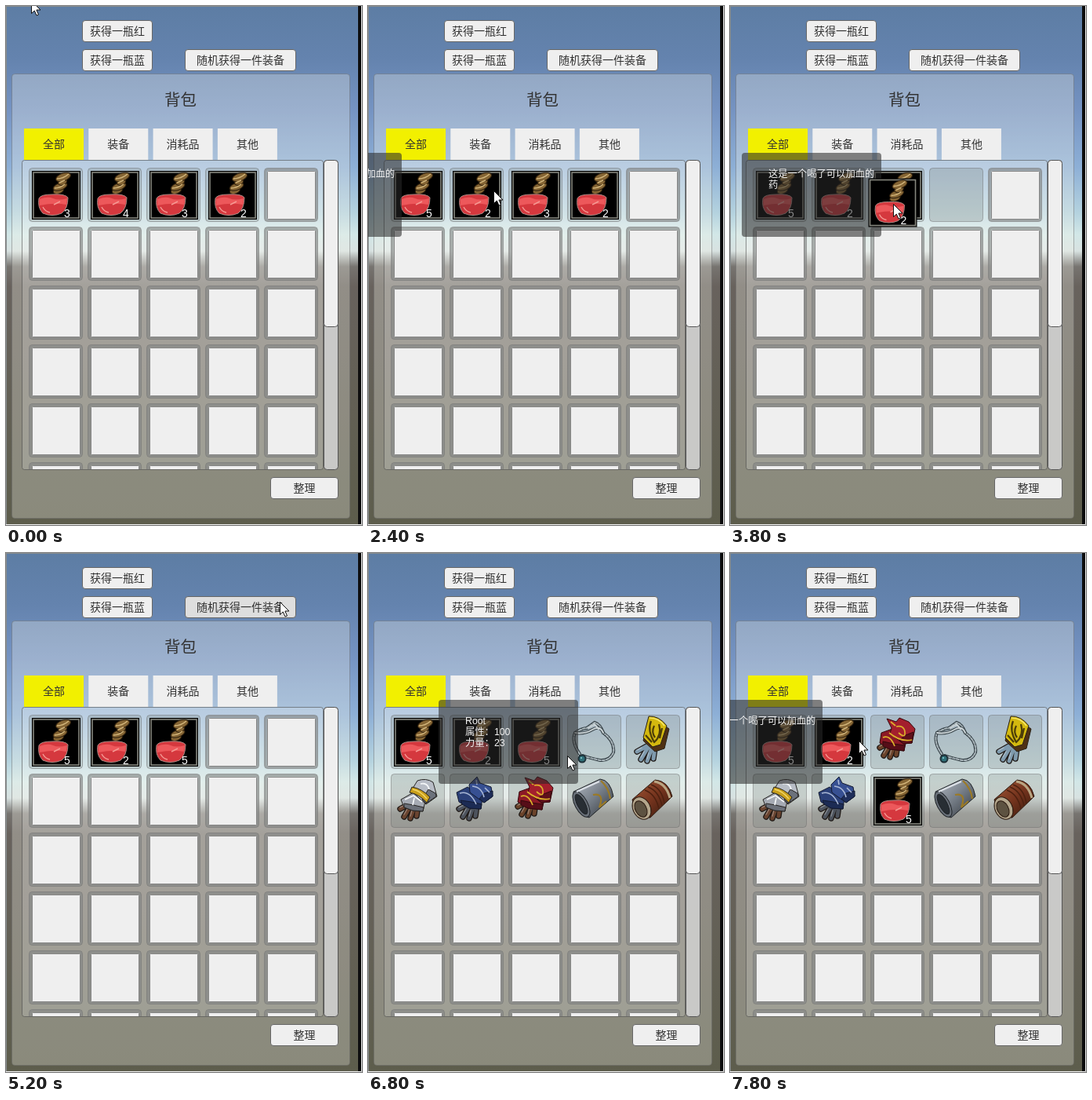
Animation, 454 px wide and 661 px high, one loop 8 s. Source, as an HTML page:

```html
<!DOCTYPE html>
<html lang="zh">
<head>
<meta charset="utf-8">
<title>背包</title>
<style>
html, body { margin: 0; width: 100%; height: 100%; overflow: hidden; background: #111; }
svg { display: block; width: 100vw; height: 100vh; }
text { font-family: "Liberation Sans", "Noto Sans CJK SC", "Noto Sans CJK", sans-serif; font-size: 14px; fill: #323232; }
.mid { text-anchor: middle; }
.num { fill: #fff; }
.tip { font-size: 12.3px; fill: #f4f4f4; }
</style>
</head>
<body>
<svg viewBox="0 0 454 661" preserveAspectRatio="none">
<defs>
  <linearGradient id="sky" x2="0" y2="661" gradientUnits="userSpaceOnUse">
    <stop offset="0" stop-color="#5d7da4"/>
    <stop offset=".1" stop-color="#6483ae"/>
    <stop offset=".2" stop-color="#7593c2"/>
    <stop offset=".31" stop-color="#8dafd6"/>
    <stop offset=".4" stop-color="#b5d3df"/>
    <stop offset=".44" stop-color="#d2e7e7"/>
    <stop offset=".472" stop-color="#d8e2e1"/>
    <stop offset=".502" stop-color="#777470"/>
    <stop offset=".54" stop-color="#68625d"/>
    <stop offset="1" stop-color="#5d5d4c"/>
  </linearGradient>
  <linearGradient id="metal" x2="1" y2="1">
    <stop offset="0" stop-color="#b4bbc4"/>
    <stop offset=".45" stop-color="#7c848e"/>
    <stop offset="1" stop-color="#2d3238"/>
  </linearGradient>
  <linearGradient id="leather" x2="1" y2="1">
    <stop offset="0" stop-color="#a35a38"/>
    <stop offset=".5" stop-color="#75341e"/>
    <stop offset="1" stop-color="#34170b"/>
  </linearGradient>
  <clipPath id="view"><rect x="21" y="197" width="383" height="393"/></clipPath>

  <g id="potion">
    <rect x="4" y="4" width="62" height="62" fill="#000"/>
    <rect x="6" y="6" width="58" height="58" fill="none" stroke="#85867d" stroke-width="1.600"/>
    <g fill="#856534" stroke="#2b1d0c">
      <ellipse cx="38" cy="29" rx="7" ry="4" transform="rotate(-20 38 29)"/>
      <ellipse cx="40" cy="24" rx="9.500" ry="4.500" transform="rotate(-20 40 24)"/>
      <ellipse cx="43" cy="18" rx="6" ry="4" transform="rotate(-20 43 18)"/>
      <ellipse cx="44" cy="12" rx="10" ry="5" transform="rotate(-20 44 12)"/>
    </g>
    <path d="M33 26q7 0 13-5M36 14q8 0 15-6M39 19l7-3" fill="none" stroke="#d3b67c" stroke-width="1.500"/>
    <path d="M13 39Q15 34 30 34Q46 33 50 38Q50 52 42 58Q30 63 18 58Q11 51 13 39Z" fill="#d5383e" stroke="#a98a84"/>
    <path d="M14 40Q24 36 31 39T49 39L48 47Q33 44 14 48Z" fill="#ed585b"/>
    <path d="M18 50q3 6 9 7M32 47l8-4" fill="none" stroke="#f59a94" stroke-width="1.400"/>
  </g>

  <path id="fingers" d="M28 36L12 45M27 38L17 55M31 40L25 57M35 40L33 54"/>
  <g id="hand" fill="none" stroke-linecap="round">
    <use href="#fingers" stroke="#1f1916" stroke-width="7.500"/>
    <use href="#fingers" stroke="currentColor" stroke-width="5"/>
    <path d="M12 43l6-3M17 52l4-7M25 54l2-7" stroke="#fff" stroke-opacity=".3" stroke-width="1.500"/>
  </g>

  <path id="chain" d="M16 50Q5 34 10 23Q17 18 25 17L35 10Q42 12 46 23Q61 34 59 48Q54 59 42 58Q28 55 20 52"/>
  <g id="necklace" fill="none" stroke-linecap="round">
    <use href="#chain" stroke="#333e44" stroke-width="4"/>
    <use href="#chain" stroke="#aab6bb" stroke-width="2" stroke-dasharray="3 2"/>
    <path d="M10 23Q22 25 32 19T46 23" stroke="#3d484d" stroke-width="4"/>
    <path d="M10 23Q22 25 32 19T46 23M27 17l8-5 5 6" stroke="#cbd4d7" stroke-width="2"/>
    <circle cx="19" cy="56" r="4.500" fill="#2f6f78" stroke="#1e3038" stroke-width="2"/>
    <circle cx="18" cy="55" r="1" fill="#8fd0d4"/>
  </g>

  <g id="gold" stroke="#2a2116" stroke-linejoin="round">
    <use href="#hand" x="2" y="2" color="#7f9aad"/>
    <path d="M28 7Q46 10 55 18L49 43L37 47L22 33Z" fill="#4f3114"/>
    <path d="M29 2Q42 1 52 14L44 38L34 41L22 29Z" fill="#d4b90f"/>
    <path d="M32 8Q27 20 36 35Q46 26 42 12M36 14q-4 8 1 15M25 26l8 9M46 17l-3 13" fill="none" stroke="#4c3d08" stroke-width="2.200"/>
    <path d="M30 4q12 0 19 10" fill="none" stroke="#f6e66a" stroke-width="1.500"/>
  </g>

  <g id="silver" stroke="#262422" stroke-linejoin="round">
    <use href="#hand" color="#6a4430"/>
    <path d="M13 33L29 24L44 35L41 48L28 47L17 43Z" fill="#a5aab3"/>
    <path d="M17 38l12 2 13 3-1 5-13-1-11-4Z" fill="#6b7079"/>
    <path d="M34 9Q45 5 54 11L59 29L45 39L26 22Z" fill="#b8bdc6"/>
    <path d="M48 20l9 5 1 4-13 9-5-5Z" fill="#6c727c"/>
    <path d="M27 17Q40 19 50 30L46 37Q36 26 24 24Z" fill="#c99f1b"/>
    <path d="M38 13q9-2 11 7M18 33l11-5 11 8M30 31l-2 9" fill="none" stroke="#f4f6f8" stroke-width="1.700"/>
    <path d="M28 20q10 2 18 12" fill="none" stroke="#f3d765" stroke-width="1.500"/>
  </g>

  <g id="blue" stroke="#131a30" stroke-linejoin="round">
    <use href="#hand" color="#4d535d"/>
    <path d="M9 24L23 17L42 30L40 45L25 44L12 36Z" fill="#2b4078"/>
    <path d="M14 34l14 2 13 3-1 6-15-1-9-5Z" fill="#1c2b54"/>
    <path d="M25 14L35 4L39 12L53 17L55 29L44 37L26 24Z" fill="#375092"/>
    <path d="M44 25l11-3v7l-11 8-6-5Z" fill="#1f2e5a"/>
    <path d="M29 16q12 1 15 14M13 25q13-4 21 14M45 18l6 6M34 8l1 6" fill="none" stroke="#aab8d6" stroke-width="1.600"/>
  </g>

  <g id="red" stroke="#33090d" stroke-linejoin="round">
    <use href="#hand" y="-3" color="#6b432a"/>
    <path d="M14 23L28 18L46 31L43 46L25 44L12 36Z" fill="#8c1926"/>
    <path d="M16 34l14 3 14 2-1 7-18-2-9-4Z" fill="#560e18"/>
    <path d="M27 17L21 5L33 9L37 4L49 9L57 18L53 36L42 37L25 24Z" fill="#a31f2d"/>
    <path d="M45 26l10-4-2 14-11 1-5-5Z" fill="#5f101a"/>
    <path d="M24 23Q38 35 53 32M33 15q10-2 11 7t-8 1M16 29q9-4 15 11M26 9l6 5" fill="none" stroke="#dcb02b" stroke-width="1.700"/>
  </g>

  <g id="steel" stroke="#1f2327">
    <path d="M8 23L42 7Q55 8 59 29L28 56Q10 51 8 23Z" fill="url(#metal)"/>
    <ellipse cx="18" cy="39" rx="8" ry="18" transform="rotate(-28 18 39)" fill="#697079"/>
    <ellipse cx="18" cy="39" rx="5" ry="14" transform="rotate(-28 18 39)" fill="#282e34"/>
    <path d="M12 23l29-13" stroke="#dbe0e6" stroke-width="2"/>
    <path d="M43 9q10 9 12 23M33 27q15-3 8 16l9-8" fill="none" stroke="#9b7a26" stroke-width="2.200"/>
  </g>

  <g id="bracer" stroke="#2b1a10">
    <path d="M8 33L37 8Q54 9 59 29L31 56Q13 57 8 33Z" fill="url(#leather)"/>
    <path d="M24 21q14 5 18 24M28 17q14 5 18 24M32 14q14 5 17 24" fill="none" stroke="#4d2110" stroke-width="1.500"/>
    <path d="M36 10q15 2 20 21" fill="none" stroke="#b9a583" stroke-width="3"/>
    <ellipse cx="20" cy="44" rx="11" ry="15" transform="rotate(-28 20 44)" fill="#b4a68c"/>
    <ellipse cx="19" cy="45" rx="7" ry="11" transform="rotate(-28 19 45)" fill="#5d5241"/>
  </g>
</defs>

<rect width="454" height="661" fill="url(#sky)"/>
<path d="M0 .5H449M.5 0V661" stroke="#858b8c"/>
<rect x="449" width="5" height="661" fill="#0b0b0c"/>
<path d="M453.500 0V660.500H0" fill="none" stroke="#eee"/>
<rect x="7.500" y="86.500" width="431" height="566" rx="4" fill="#f0f0e8" fill-opacity=".3" stroke="#666" stroke-opacity=".45"/>
<g id="ui"></g>
<rect x="20.500" y="196.500" width="384" height="394" rx="3" fill="#fff" fill-opacity=".17" stroke="#444" stroke-opacity=".55"/>
<g id="grid" clip-path="url(#view)"></g>
<rect x="405.500" y="196.500" width="18" height="394" rx="4" fill="#d4d4d4" fill-opacity=".85" stroke="#555"/>
<rect x="405.500" y="196.500" width="18" height="212" rx="4" fill="#efefef" stroke="#555"/>
<g id="tip">
  <rect y="187" width="178" height="107" rx="4" fill="#292929" fill-opacity=".57"/>
  <text class="tip" x="34" y="218"></text>
  <text class="tip" x="34" y="232"></text>
  <text class="tip" x="34" y="246"></text>
</g>
<g id="drag"><use href="#potion"/><text class="num" x="45" y="62"></text></g>
<path id="cursor" d="M.5 .5V16.500L4.300 13L7 19L9.500 18L6.900 12H12Z" fill="#fff" stroke="#111"/>
</svg>

<script>
const NS = "http://www.w3.org/2000/svg", LOOP = 8000, STEP = 200;
const $ = id => document.getElementById(id);

function add(parent, tag, attrs, label) {
  const el = document.createElementNS(NS, tag);
  for (const k in attrs) el.setAttribute(k, attrs[k]);
  if (label) el.textContent = label;
  parent.append(el);
  return el;
}
const show = (el, on) => el.setAttribute("display", on ? "inline" : "none");
const move = (el, x, y) => el.setAttribute("transform", `translate(${x} ${y})`);

function button(x, y, w, label) {
  const box = add($("ui"), "rect", { x: x + .5, y: y + .5, width: w - 1, height: 27, rx: 3.5, fill: "#efefef", stroke: "#666" });
  add($("ui"), "text", { x: x + w / 2, y: y + 19, class: "mid" }, label);
  return box;
}
button(97, 18, 90, "获得一瓶红");
button(97, 55, 90, "获得一瓶蓝");
const gearButton = button(228, 55, 142, "随机获得一件装备");
button(337, 600, 87, "整理");
add($("ui"), "text", { x: 222.5, y: 127, class: "mid", style: "font-size:20.5px" }, "背包");
["全部", "装备", "消耗品", "其他"].forEach((label, i) => {
  const x = 23 + i * 82.3;
  add($("ui"), "rect", { x, y: 156, width: 76, height: 40, fill: i ? "#efefef" : "#f2f000" });
  add($("ui"), "text", { x: x + 38, y: 181, class: "mid" }, label);
});

const slots = Array.from({ length: 30 }, (_, i) => {
  const g = add($("grid"), "g", {});
  move(g, 29 + i % 5 * 75, 206 + Math.floor(i / 5) * 75);
  add(g, "rect", { x: .5, y: .5, width: 68, height: 68, rx: 4, fill: "#737d7b", "fill-opacity": .28, stroke: "#666", "stroke-opacity": .45 });
  const blank = add(g, "g", {});
  add(blank, "rect", { x: 2, y: 2, width: 65, height: 65, rx: 3, fill: "none", stroke: "#888", "stroke-opacity": .55, "stroke-width": 3 });
  add(blank, "rect", { x: 4.5, y: 4.5, width: 61, height: 61, rx: 1, fill: "#efefef", stroke: "#858585" });
  return { blank, art: add(g, "use", {}), num: add(g, "text", { x: 45, y: 63, class: "num" }) };
});

// time, x, y of the pointer tip
const path = [
  [0, 32, -7], [400, 100, 62], [1200, 288, 248], [1400, 133, 238], [1600, 96, 243],
  [1800, 66, 244], [2000, 66, 244], [2400, 160, 235], [2800, 232, 240], [3200, 290, 245],
  [3400, 286, 250], [3800, 208, 252], [4200, 212, 250], [4400, 228, 236], [5000, 346, 64],
  [5200, 349, 62], [6400, 349, 62], [6600, 348, 215], [6800, 254, 258], [7000, 222, 245],
  [7200, 214, 284], [7400, 214, 318], [7600, 202, 272], [7800, 164, 239]
];
// start, end, slot
const drags = [[1600, 1800, 1], [3400, 4200, 3], [7200, 7400, 2]];
const potionTip = ["这是一个喝了可以加血的", "药", ""];
const gearTip = ["Root", "属性：100", "力量：23"];
// start, end, anchor slot, lines
const tips = [
  [1600, 1800, 1, potionTip], [2400, 2800, 1, potionTip], [2800, 3200, 2, potionTip],
  [3200, 4200, 3, potionTip], [6800, 7000, 4, gearTip], [7000, 7200, 3, potionTip],
  [7200, 7400, 2, potionTip], [7400, 7600, 7, potionTip], [7600, 7800, 7, gearTip],
  [7800, 8000, 2, potionTip]
];
const gear = ["necklace", "gold", "silver", "blue", "red", "steel", "bracer"];
const gearTimes = [5400, 5800, 6000, 6000, 6200, 6200, 6400];

const active = (list, t) => list.find(([a, b]) => t >= a && t < b);

function pointer(t) {
  const i = path.findIndex(p => p[0] > t);
  if (i < 0) return path.at(-1).slice(1);
  const [a, x, y] = path[i - 1], [b, x2, y2] = path[i], k = (t - a) / (b - a);
  return [x + (x2 - x) * k, y + (y2 - y) * k];
}

function inventory(t) {
  const items = t < 1800 ? [3, 4, 3, 2] : t < 4200 ? [5, 2, 3, 2] : [5, 2, 5];
  gear.forEach((name, i) => { if (t >= gearTimes[i]) items.push(name); });
  if (t >= 7400) [items[2], items[7]] = [items[7], items[2]];
  return items;
}

function render(t) {
  const items = inventory(t), drag = active(drags, t), tip = active(tips, t);
  const [x, y] = pointer(t);
  slots.forEach(({ blank, art, num }, i) => {
    const item = items[i], count = typeof item === "number";
    const visible = item !== undefined && !(drag && drag[2] === i);
    show(blank, item === undefined);
    show(art, visible);
    show(num, visible && count);
    if (visible) art.setAttribute("href", "#" + (count ? "potion" : item));
    num.textContent = count ? item : "";
  });
  show($("drag"), drag);
  if (drag) {
    move($("drag"), x - 35.5, y - 36.5);
    $("drag").lastElementChild.textContent = items[drag[2]];
  }
  show($("tip"), tip);
  if (tip) {
    const [, , slot, lines] = tip;
    move($("tip"), -210 + slot % 5 * 75, Math.floor(slot / 5) * 75);
    $("tip").querySelectorAll("text").forEach((el, i) => { el.textContent = lines[i]; });
  }
  gearButton.setAttribute("fill", t >= 5000 && t <= 6400 ? "#dedede" : "#efefef");
  move($("cursor"), x, y);
}

let last = -1;
const start = performance.now();
function loop(now) {
  const t = Math.floor(Math.max(0, now - start) % LOOP / STEP) * STEP;
  if (t !== last) render(last = t);
  requestAnimationFrame(loop);
}
render(0);
requestAnimationFrame(loop);
</script>
</body>
</html>
```
